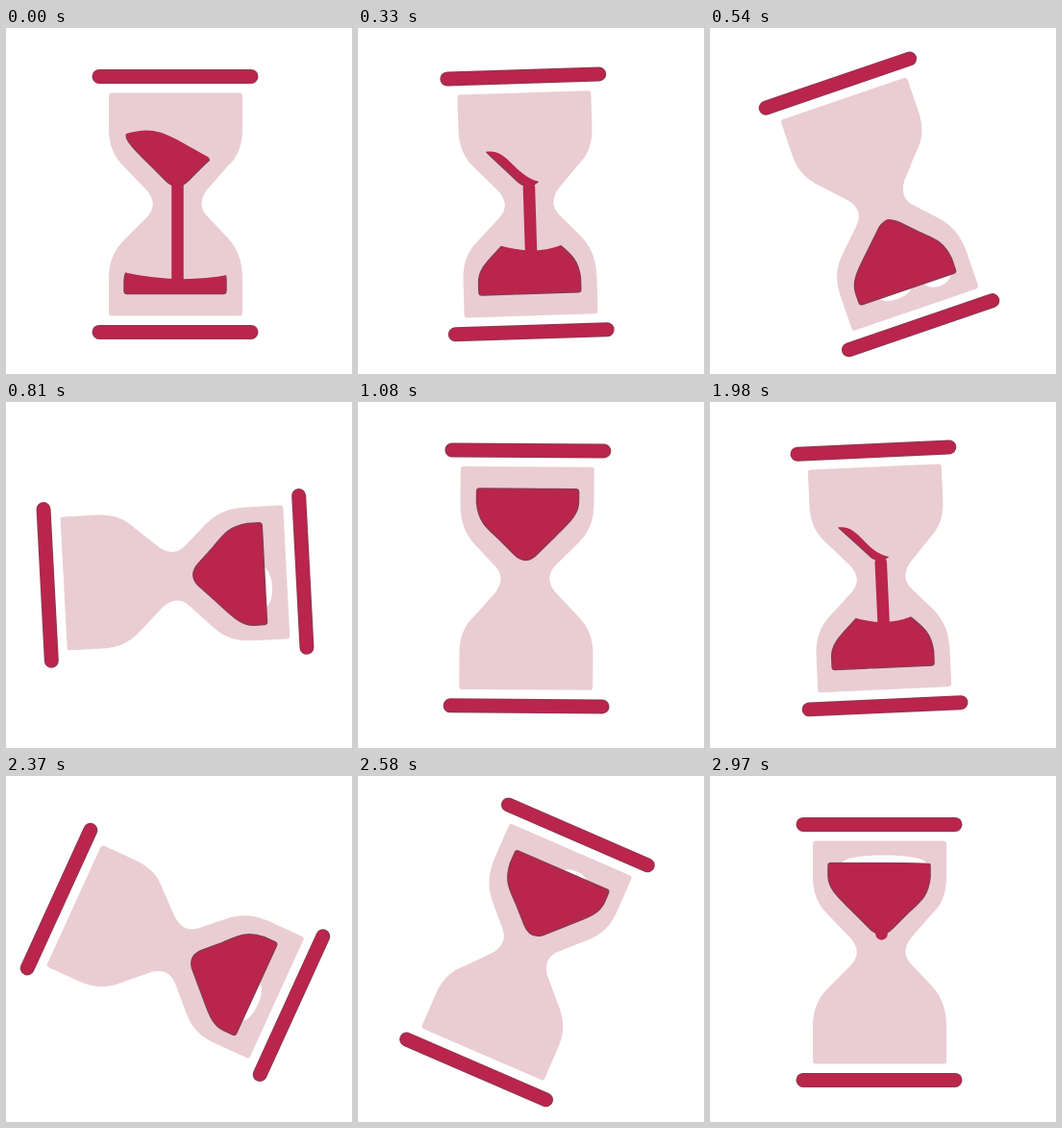
An HTML page with a canvas that plays this animation: 360 by 360 pixels, repeating every 3000 ms.

```html
<!DOCTYPE html>
<html lang="en">
<head>
<meta charset="utf-8">
<title>Hourglass</title>
<style>
html, body { margin: 0; height: 100%; overflow: hidden; background: #fff; }
canvas { display: block; }
</style>
</head>
<body>
<canvas width="360" height="360"></canvas>
<script>
const ctx = document.querySelector('canvas').getContext('2d');
const RED = '#ba254b', EDGE = '#8f3752', PINK = '#e9cdd3';
const LOOP = 3000, CYCLE = 1629;
const SPIN_START = 221, SPIN_TIME = 882, SPIN_END = SPIN_START + SPIN_TIME;

// Shapes are centred on the pivot of the hourglass.
const glass = new Path2D(`M-69-113Q-69-116-66-116H67Q70-116 70-113V-78
  C70-60 64-48 54-39L33-15Q22 0 33 12L54 34C66 47 70 60 70 78V113
  Q70 116 67 116H-66Q-69 116-69 113V78C-69 60-64 48-53 37L-30 14
  Q-17 1-29-14L-53-39C-64-50-69-62-69-78Z`);
const sand = new Path2D(`M-53-90Q-53-93-50-93H50Q53-93 53-90V-78
  C51-58 42-52 30-41L14-25Q3-14-8-23L-29-44C-42-57-53-66-53-80Z`);

const clamp = (x, lo = 0, hi = 1) => Math.min(hi, Math.max(lo, x));

// Cubic Bezier easing with horizontal ends: solve for x by bisection
function ease(x, x1, x2) {
  if (x <= 0 || x >= 1) return clamp(x);
  let lo = 0, hi = 1, s;
  for (let i = 0; i < 24; i++) {
    s = (lo + hi) / 2;
    const r = 1 - s;
    if (3 * r * r * s * x1 + 3 * r * s * s * x2 + s ** 3 < x) lo = s;
    else hi = s;
  }
  return s * s * (3 - 2 * s);
}

function line(x1, y1, x2, y2, width, color) {
  ctx.lineWidth = width;
  ctx.strokeStyle = color;
  ctx.beginPath();
  ctx.moveTo(x1, y1);
  ctx.lineTo(x2, y2);
  ctx.stroke();
}

function bar(y) {
  line(-79, y, 79, y, 15, EDGE);
  line(-79, y, 79, y, 13, RED);
}

// White sliver along the flat side of the sand, swelling and shrinking
function gap(u, from, to, mid, half, side) {
  if (u <= from || u >= to) return;
  const swell = Math.sin(Math.PI * (u - from) / (to - from));
  const y = 93 * side, peak = y + 10.5 * swell * side;
  const a = mid - half * swell, b = mid + half * swell;
  ctx.fillStyle = '#fff';
  ctx.beginPath();
  ctx.moveTo(a, y);
  ctx.bezierCurveTo(a + 4, peak, b - 4, peak, b, y);
  ctx.fill();
}

function fillSand(region, side) {
  ctx.save();
  ctx.clip(region);
  ctx.scale(1, side);
  ctx.fillStyle = RED;
  ctx.fill(sand);
  ctx.lineWidth = 1.5;
  ctx.strokeStyle = EDGE;
  ctx.stroke(sand);
  ctx.restore();
}

// The surface sinks faster on the right, leaving a sliver on the left wall.
function drawTop(u) {
  const k = Math.max(0, (u + 288) / 638);
  if (k > 1.15) return;
  const sink = (depth, power) => -94 + depth * k ** power;
  const region = new Path2D();
  region.moveTo(-54 + 14 * k * k, sink(39, 0.8));
  region.bezierCurveTo(-18, sink(37, 1.6), 18 - 33 * k ** 0.4, sink(64, 1.3),
    54 - 43 * k, sink(72, 0.6));
  region.lineTo(60, 0);
  region.lineTo(-60, 0);
  fillSand(region, 1);
}

function drawPile(u) {
  const k = clamp((u + 190) / 670);
  if (!k) return;
  const y = 94 - 58 * k - 21 * k ** 12, w = 62 - 42 * k ** 1.5;
  const region = new Path2D();
  region.moveTo(-60, y - 7);
  region.lineTo(-w, y - 7);
  region.quadraticCurveTo(3, y + 6, w, y - 4);
  region.lineTo(60, y - 4);
  region.lineTo(60, 100);
  region.lineTo(-60, 100);
  fillSand(region, -1);
}

function drawStem(u) {
  if (u < -300) return;
  const fall = 0.00068 * Math.max(0, u - 290) ** 2;
  const end = clamp(u + 267, -21, 80);
  line(2.5, Math.min(30, fall - 19), 2.5, end, 12.5, RED);
}

// Each cycle drains the sand, then turns the glass; u is zero mid-drain.
function draw(t) {
  const u = (t + CYCLE - SPIN_END) % CYCLE - CYCLE + SPIN_END;
  ctx.clearRect(0, 0, 360, 360);
  ctx.save();
  ctx.translate(176, 183.4);
  ctx.rotate(-Math.PI * ease((u - SPIN_START) / SPIN_TIME, 0.75, 0.68));
  ctx.lineCap = 'round';
  bar(-133);
  bar(133);
  ctx.fillStyle = PINK;
  ctx.fill(glass);
  gap(u, -500, -80, 5, 44, -1);
  gap(u, 300, 1120, -14, 22, 1);
  gap(u, 430, 650, 32, 15, 1);
  drawTop(u);
  drawPile(u);
  drawStem(u);
  ctx.restore();
}

const start = performance.now();
function tick() {
  draw((performance.now() - start) % LOOP);
  requestAnimationFrame(tick);
}
tick();
</script>
</body>
</html>
```
